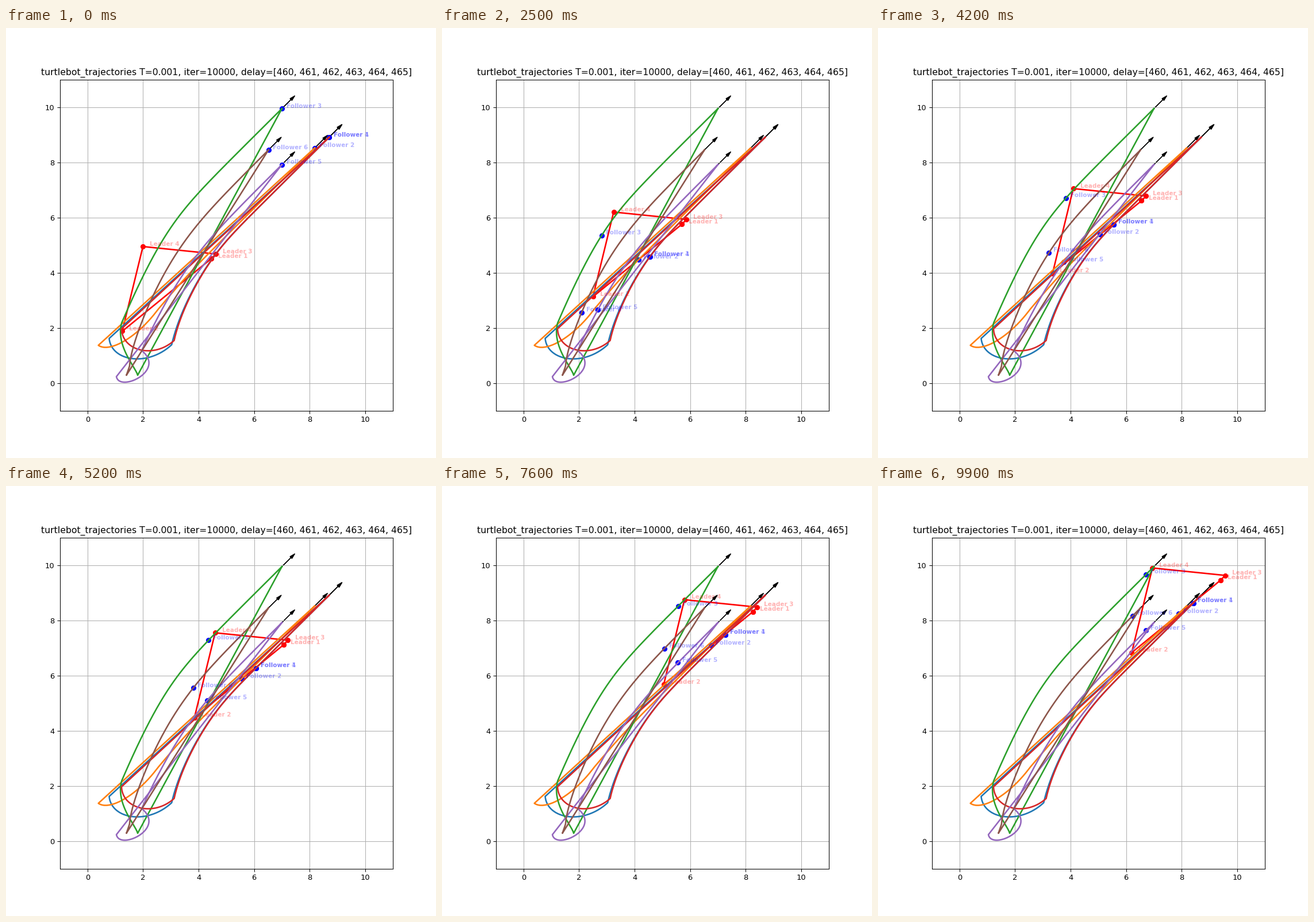
A matplotlib script for the animation above (10 s loop, 748 by 748 pixels).

```python
import numpy as np
import matplotlib.pyplot as plt
from matplotlib.animation import FuncAnimation

FRAMES, STEP, TOTAL = 100, 0.1, 10
SPEED = 0.5
DELAYS = [460 + k for k in range(6)]

LEADERS = np.array([(4.455, 4.51), (1.25, 1.88), (4.617, 4.68), (1.995, 4.95)])
OUTLINE = [0, 1, 3, 2, 0]


class Follower:
    """A Bezier turn until `switch`, then a damped approach to a steady diagonal."""

    def __init__(self, turn, end, push, rate, switch=0.46):
        self.turn, self.end, self.push = map(np.array, (turn, end, push))
        self.rate, self.switch = rate, switch

    def steady(self, t):
        return self.end - SPEED * (TOTAL - t)

    def at(self, t):
        t = np.asarray(t, float)[..., None]
        a, b, c, d = self.turn
        q = np.clip(t / self.switch, 0, 1)
        bend = ((1 - q) ** 3 * a + 3 * q * (1 - q) ** 2 * b
                + 3 * q * q * (1 - q) * c + q ** 3 * d)
        u = np.maximum(t - self.switch, 0)
        gap = d - self.steady(self.switch)
        chase = self.steady(t) + (gap + self.push * u) * np.exp(-self.rate * u)
        pos = np.where(t < self.switch, bend, chase)
        return np.where(t < 0, self.end, pos)

    def outline(self):
        t = np.linspace(0, TOTAL, 1001)
        return np.vstack([self.end, self.at(t)])


followers = [
    Follower([(.78, 1.62), (.85, .80), (2.15, .57), (3.03, 1.39)],
             end=(8.70, 8.91), push=(-1.35, -2.05), rate=1.8),
    Follower([(.39, 1.37), (.80, 1.08), (1.80, 1.67), (2.53, 2.66)],
             end=(8.18, 8.52), push=(-.15, -.15), rate=2),
    Follower([(1.805, .285), (1.75, .55), (1.0, 1.35), (1.23, 2.185)],
             end=(7.0, 9.95), push=(0, 0), rate=1),
    Follower([(1.225, 1.97), (1.25, 1.17), (2.37, .87), (3.12, 1.545)],
             end=(8.70, 8.91), push=(-1.33, -2.2), rate=1.8),
    Follower([(1.04, .235), (1.15, -.35), (2.85, .45), (1.95, 1.18)],
             end=(7.0, 7.92), push=(-.56, -1.75), rate=1, switch=0.84),
    Follower([(1.40, .285), (1.44, .40), (1.48, .50), (1.515, .63)],
             end=(6.515, 8.45), push=(-.86, -2.55), rate=1, switch=0.84),
]

fig, ax = plt.subplots(figsize=(8, 8), dpi=93.5)
ax.set(xlim=(-1, 11), ylim=(-1, 11))
ax.grid(True)
ax.set_title(f"turtlebot_trajectories T=0.001, iter=10000, delay={DELAYS}")


def make_labels(name, count, color):
    return [ax.text(0, 0, f"{name} {k + 1}", color=color, alpha=0.3,
                    fontsize=8, weight="bold") for k in range(count)]


def place(labels, points, dx):
    for label, (x, y) in zip(labels, points):
        label.set_position((x + dx, y + 0.03))


hull, = ax.plot([], [], "ro-", lw=2)
dots, = ax.plot([], [], "bo")
shaft = 0.46 * np.sqrt(0.5)
for f in followers:
    ax.plot(*f.outline().T, lw=2, color=f"C{followers.index(f)}")
    ax.arrow(*f.end, shaft, shaft, head_width=0.1, head_length=0.2, color="k")

leader_labels = make_labels("Leader", len(LEADERS), "red")
follower_labels = make_labels("Follower", len(followers), "blue")


def update(n):
    t = n * STEP
    lead = LEADERS + SPEED * t
    follow = np.array([f.at(t - d / 1000) for f, d in zip(followers, DELAYS)])
    hull.set_data(*lead[OUTLINE].T)
    dots.set_data(*follow.T)
    place(leader_labels, lead, 0.25)
    place(follower_labels, follow, 0.16)
    return [hull, dots, *leader_labels, *follower_labels]


anim = FuncAnimation(fig, update, frames=FRAMES, interval=1000 * STEP, repeat=True)
plt.show()
```
